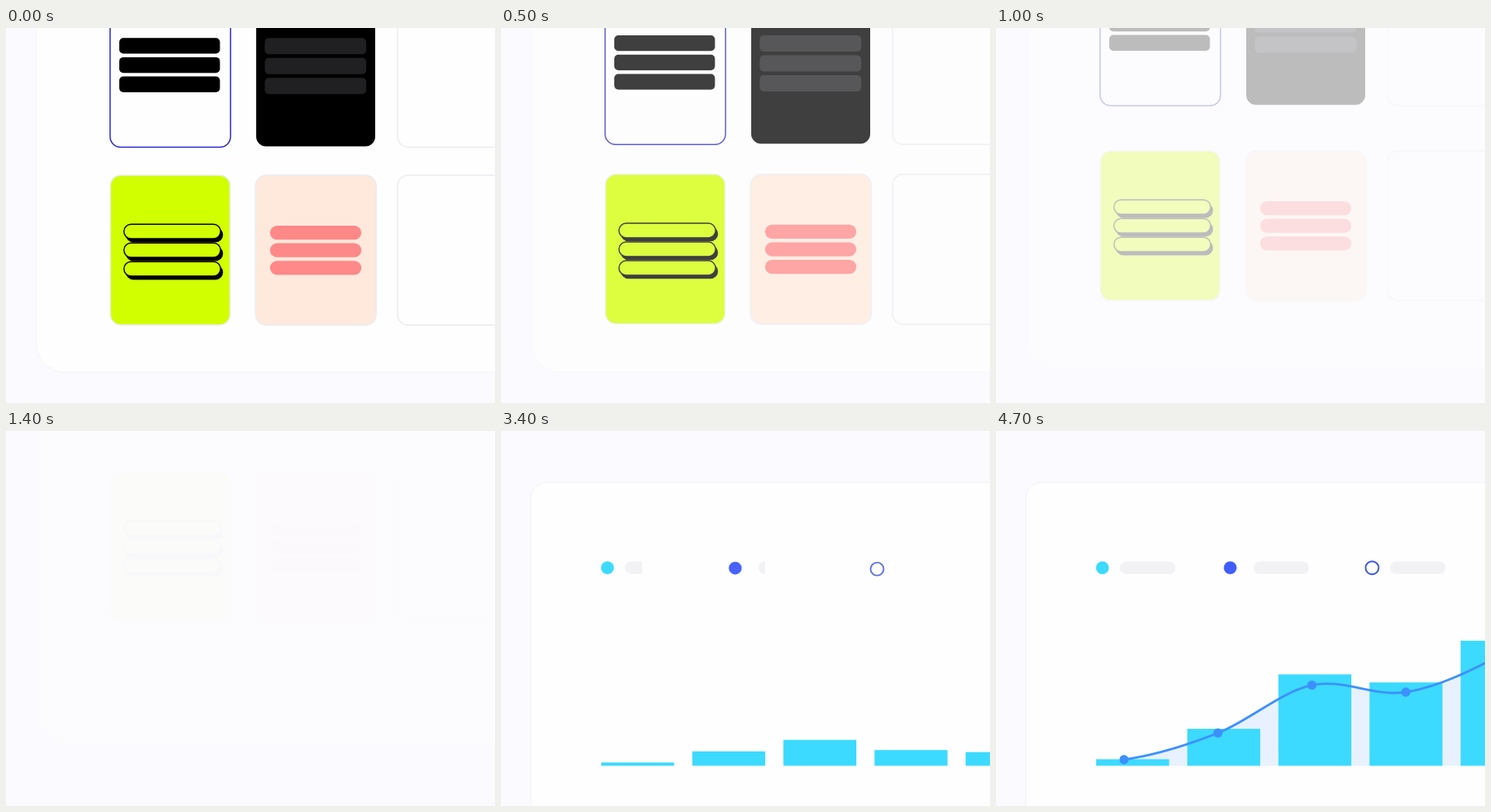
An HTML page for the animation above (4800 ms loop, 600 by 461 pixels).

```html
<!DOCTYPE html>
<html lang="en">
<head>
<meta charset="utf-8">
<title>Cards to chart</title>
<style>
  html, body { margin: 0; width: 100%; height: 100%; overflow: hidden; background: #fbfaff; }
  svg { display: block; width: 100%; height: 100%; }
</style>
</head>
<body>
<svg viewBox="0 0 600 461">
  <g id="cards">
    <rect id="cardPanel" x="37.5" y="-300" width="1100" height="723" rx="34" fill="#fefefe" stroke="#f4f3f8"/>
    <g id="upperRow"></g>
    <g id="lowerRow"></g>
  </g>
  <g id="chart">
    <rect id="chartPanel" x="36.5" y="63" width="1100" height="700" rx="20" fill="#fefdff" stroke="#f1f0f6"/>
    <g id="legend"></g>
    <clipPath id="wipe"><rect id="wipeBox" x="151.5" y="150" width="0" height="300"/></clipPath>
    <path id="area" fill="#3c90ff" fill-opacity=".11" clip-path="url(#wipe)"/>
    <g id="columns" fill="#3cdaff"></g>
    <g clip-path="url(#wipe)">
      <path id="line" fill="none" stroke="#3c90ff" stroke-width="2.8"/>
      <g id="dots" fill="#3c90ff"></g>
    </g>
  </g>
</svg>
<script>
(() => {
  const LOOP = 4800, TICK = 100, BASE = 411.5;
  const $ = id => document.getElementById(id);

  function set(el, attrs) {
    for (const k in attrs) el.setAttribute(k, attrs[k]);
  }
  function add(parent, tag, attrs) {
    const el = document.createElementNS('http://www.w3.org/2000/svg', tag);
    set(el, attrs);
    return parent.appendChild(el);
  }
  const rect = (parent, x, y, width, height, rx, fill, more) =>
    add(parent, 'rect', { x, y, width, height, rx, fill, ...more });

  // Easing
  const clamp = p => Math.min(1, Math.max(0, p));
  const sine = (t, start, length) => (1 - Math.cos(Math.PI * clamp((t - start) / length))) / 2;
  const lift = (t, start, size) => -size * Math.max(0, t - start) ** 4;
  const expo = p => p < .5 ? 2 ** (20 * p - 11) : 1 - 2 ** (9 - 20 * p);

  // Template cards
  const upper = $('upperRow'), lower = $('lowerRow');
  const pale = { stroke: '#ececf1', 'stroke-width': 1.5 };
  rect(upper, 127.7, -38, 147.8, 184.5, 13, '#fefefe', { stroke: '#2a28cc', 'stroke-width': 1.5 });
  rect(upper, 307, -38, 146, 183.5, 12, '#000');
  rect(upper, 480.5, -38, 148, 184.5, 13, '#fefefe', pale);
  rect(lower, 128, 181, 147, 184, 13, '#d2ff00', pale);
  rect(lower, 306.2, 181, 148, 184.3, 13, '#ffe9dc', pale);
  rect(lower, 480.5, 181, 148, 184.3, 13, '#fefefe', pale);
  for (let i = 0; i < 3; i++) {
    rect(upper, 139, 12.2 + 23.7 * i, 123.5, 19.3, 5, '#000');
    rect(upper, 317.5, 12.2 + 24.5 * i, 124.5, 20, 5, '#202022');
    const y = 241.2 + 23 * i;
    rect(lower, 147, y + 3.8, 119.3, 18.4, 9.2, '#000');
    rect(lower, 144.7, y, 118.6, 17.8, 8.9, '#d2ff00', { stroke: '#000', 'stroke-width': 1.4 });
    rect(lower, 324, 243 + 21.6 * i, 112, 17.2, 8.6, '#ff8888');
  }

  // Legend: each marker has a placeholder label revealed from the left
  const marks = [[130.6, 152], [287.4, 316], [461.5, 483.5]].map(([cx, x], i) => {
    const ring = i === 2;
    const dot = add($('legend'), 'circle', {
      cx, r: ring ? 8 : 7.9,
      fill: ring ? 'none' : ['#3cdaff', '#405cff'][i],
      stroke: ring ? '#3a55dc' : 'none', 'stroke-width': 1.9
    });
    const clip = add($('legend'), 'clipPath', { id: 'label' + i });
    const reveal = rect(clip, x, 155, 0, 26, 0, '#000');
    rect($('legend'), x, 160.5, 68, 15.3, 7.6, '#f2f1f4', { 'clip-path': `url(#label${i})` });
    return { dot, reveal };
  });

  const heights = [8, 45.4, 112.3, 102.4, 153.7];
  const columns = heights.map((h, i) =>
    add($('columns'), 'rect', { x: 122.9 + 111.8 * i, width: 89.5 }));

  // Smooth line through evenly spaced points
  const ys = [404, 371.3, 312.4, 321, 276, 200];
  const px = i => 157 + 115.3 * i;
  const slope = i => (ys[Math.min(i + 1, 5)] - ys[Math.max(i - 1, 0)]) / 2;
  let curve = `M${px(0)} ${ys[0]}`;
  for (let i = 0; i < 5; i++) {
    curve += `C${px(i + 1 / 3)} ${ys[i] + slope(i) / 3} ` +
      `${px(i + 2 / 3)} ${ys[i + 1] - slope(i + 1) / 3} ${px(i + 1)} ${ys[i + 1]}`;
  }
  set($('line'), { d: curve });
  set($('area'), { d: `${curve}V${BASE}H${px(0)}Z` });
  ys.forEach((cy, i) => add($('dots'), 'circle', { cx: px(i), cy, r: 5.7 }));

  function drawCards(t) {
    t = Math.min(t, 1.4);
    const fade = 1 - sine(t, 0, 1.5);
    set(upper, { opacity: fade, transform: `translate(0 ${lift(t, 0, 51)})` });
    set(lower, { opacity: fade, transform: `translate(0 ${lift(t, .1, 45.7)})` });
    set($('cardPanel'), {
      opacity: .4 + .6 * fade, 'stroke-opacity': fade,
      transform: `translate(${2.5 * (1 - fade)} ${lift(t, .56, 80)})`
    });
  }

  function drawChart(t) {
    const enter = sine(t, 2.38, 1);
    set($('chartPanel'), {
      'stroke-opacity': enter,
      transform: `translate(${3.5 * (1 - enter)} ${2.8 * (1 - enter)})`
    });
    marks.forEach(({ dot, reveal }, i) => {
      const e = sine(t, 2.38 + .15 * i, 1);
      set(dot, { cy: 176.2 - 8 * e, opacity: e });
      set(reveal, { width: 68 * sine(t, 3.025 + .15 * i, 1) });
    });
    columns.forEach((column, i) => {
      const height = heights[i] * sine(t, 3.05 + .05 * i, .7);
      set(column, { y: BASE - height, height });
    });
    set($('wipeBox'), { width: t < 4 ? 0 : 1000 * expo((t - 4) / 1.2) });
  }

  function draw(ms) {
    const t = Math.floor(ms % LOOP / TICK) * TICK / 1000;
    const first = t < 2.6;
    set($('cards'), { display: first ? 'inline' : 'none' });
    set($('chart'), { display: first ? 'none' : 'inline' });
    (first ? drawCards : drawChart)(t);
  }

  let began;
  function loop(now) {
    began ??= now;
    draw(now - began);
    requestAnimationFrame(loop);
  }
  draw(0);
  requestAnimationFrame(loop);
})();
</script>
</body>
</html>
```
